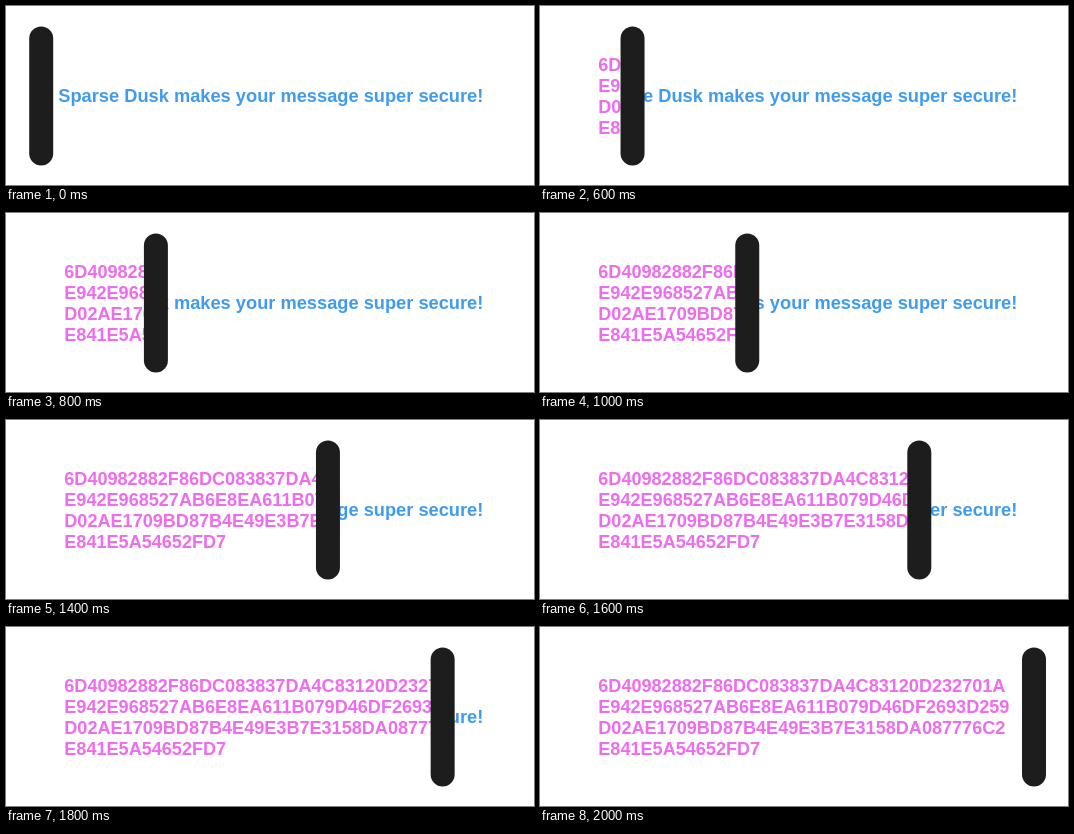
Animation of 528x179 px, one loop 2600 ms. Source, as an HTML page:

```html
<!DOCTYPE html>
<html lang="en">
<head>
<meta charset="utf-8">
<title>Message encryption wipe</title>
<style>
  html, body { margin: 0; width: 100%; height: 100%; overflow: hidden; background: #fff; }
  svg { display: block; width: 528px; height: 179px; }
  text { font-family: "Liberation Sans", Arial, sans-serif; font-weight: bold; }
  #plain { font-size: 18.26px; fill: #3f9bef; }
  #cipher { font-size: 18.08px; fill: #ee6cee; }
</style>
</head>
<body>
<svg viewBox="0 0 528 179">
  <defs>
    <clipPath id="leftSide"><rect id="leftRect" width="0" height="179"/></clipPath>
    <clipPath id="rightSide"><rect id="rightRect" width="528" height="179"/></clipPath>
  </defs>
  <g clip-path="url(#rightSide)">
    <text id="plain" x="52.3" y="96.3">Sparse Dusk makes your message super secure!</text>
  </g>
  <g id="cipher" clip-path="url(#leftSide)"></g>
  <rect id="bar" y="20.5" width="24" height="139" rx="12" fill="#1d1d1d"/>
</svg>
<script>
  const LOOP = 2600, HOLD = 600, STEP = 200, LAST_STEP = 8;
  const BAR_START = 23.2, BAR_STRIDE = 57.35, BAR_WIDTH = 24;
  const CIPHER_LINES = [
    "6D40982882F86DC083837DA4C83120D232701A",
    "E942E968527AB6E8EA611B079D46DF2693D259",
    "D02AE1709BD87B4E49E3B7E3158DA087776C2",
    "E841E5A54652FD7"
  ];
  const byId = id => document.getElementById(id);
  const bar = byId("bar"), leftRect = byId("leftRect"), rightRect = byId("rightRect");

  CIPHER_LINES.forEach((line, i) => {
    const text = document.createElementNS("http://www.w3.org/2000/svg", "text");
    text.setAttribute("x", 58.3);
    text.setAttribute("y", 65 + 21 * i);
    text.textContent = line;
    byId("cipher").append(text);
  });

  // The bar jumps in equal strides; its centre line separates the two texts.
  function draw(time) {
    const t = time % LOOP;
    const step = t < HOLD ? 0 : Math.min(LAST_STEP, 1 + Math.floor((t - HOLD) / STEP));
    const x = BAR_START + BAR_STRIDE * step;
    const edge = x + BAR_WIDTH / 2;
    bar.setAttribute("x", x);
    leftRect.setAttribute("width", edge);
    rightRect.setAttribute("x", edge);
  }

  const start = performance.now();
  function tick() {
    draw(performance.now() - start);
    requestAnimationFrame(tick);
  }
  tick();
</script>
</body>
</html>
```
